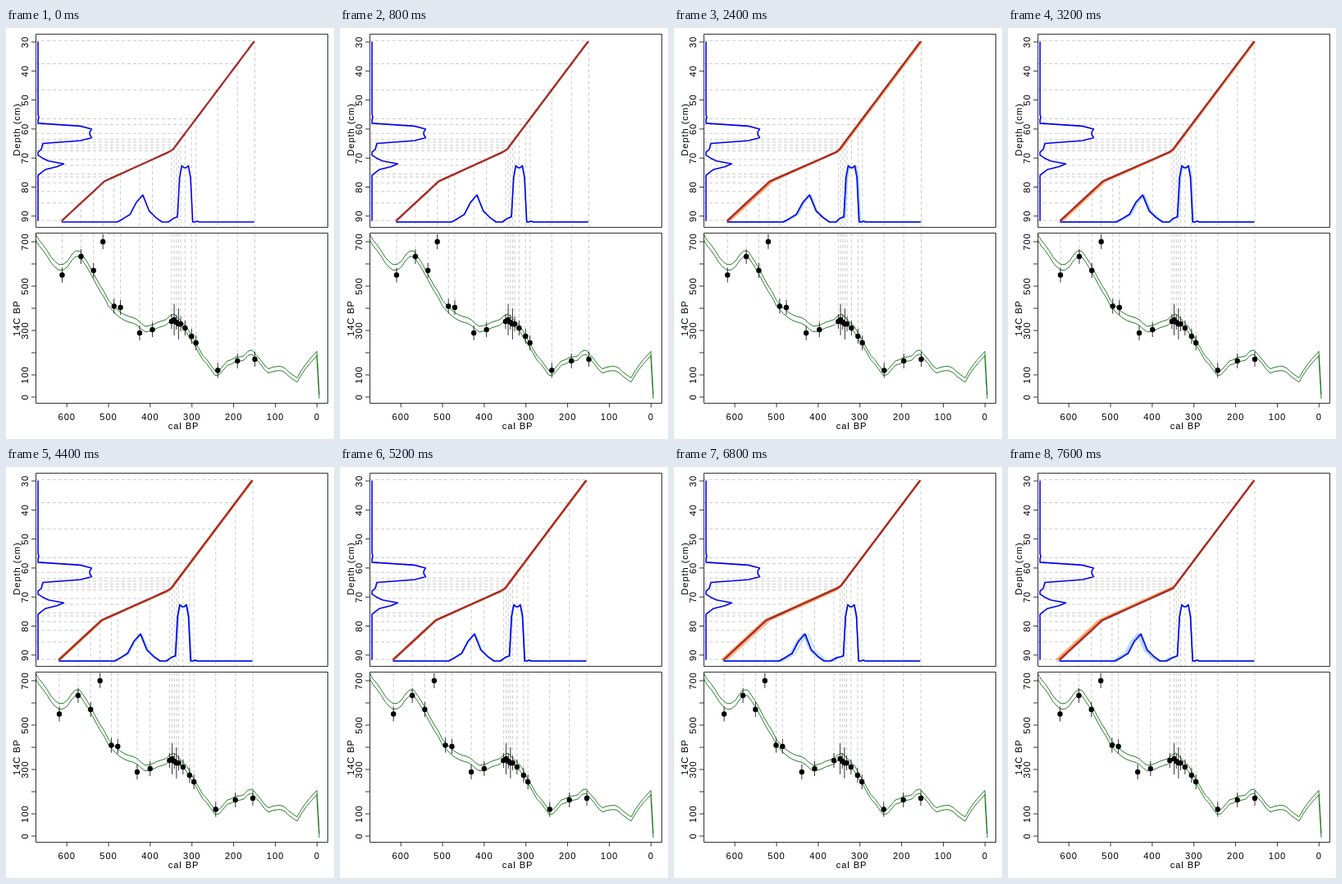
Recreate the animation shown at these times as an HTML page. Size 400 px wide and 500 px high, loop 8 s.

```html
<!DOCTYPE html>
<html>
<head>
<meta charset="utf-8">
<style>
html, body { margin: 0; height: 100%; overflow: hidden; background: #fff; }
svg { display: block; width: 100vw; height: 100vh; fill: none; stroke-linejoin: round; stroke-linecap: round; }
text { font: 11.2px "Liberation Sans", Arial, sans-serif; letter-spacing: 0.9px; fill: #000; text-anchor: middle; }
.axis { stroke: #000; stroke-width: 0.8; stroke-linecap: butt; }
.dash { stroke: #cbcbcb; stroke-dasharray: 4 3; stroke-linecap: butt; }
.curve { stroke: #0f6e0f; stroke-width: 0.9; }
.model { stroke: #a52a2a; stroke-width: 2.3; }
.proxy { stroke: #0000f0; stroke-width: 1.6; }
.oldModel { stroke: #f58a3a; stroke-width: 2; }
.oldProxy { stroke: #8fc1e6; stroke-width: 1.4; }
.bars { stroke: #333; }
.dots { stroke: #000; stroke-width: 6.4; }
</style>
</head>
<body>
<svg viewBox="0 0 400 500">
  <defs><clipPath id="low"><rect x="36" y="250" width="357" height="207"/></clipPath></defs>
  <g id="scene"></g>
  <g id="axes"></g>
</svg>
<script>
const STEP = 400, COUNT = 20, TRAIL = 6;
const ageX = a => 379.3 - 0.5085 * a;
const depthY = d => 17 + 3.53 * (d - 30);
const c14Y = c => 449 - 0.27 * c;
const mix = (a, b, t) => a + (b - a) * t;
const line = pts => 'M' + pts.map(p => p.map(v => v.toFixed(2)).join()).join('L');
const path = (cls, d, extra = '') => `<path class="${cls}" d="${d}" ${extra}/>`;

// Linear interpolation in rows sorted by their first entry
function lerpRows(rows, at) {
  const i = Math.max(1, rows.findIndex(r => r[0] >= at));
  const p = rows[i - 1], q = rows[i];
  return p.map((v, j) => mix(v, q[j], (at - p[0]) / (q[0] - p[0])));
}

// Dated samples: depth, y of the date, half length of its error bar
const dates = [
  [29.5, 403], [37.5, 405], [46.5, 416.5], [56.5, 383], [58.5, 375], [61.5, 365], [63.5, 360],
  [64.5, 360, 18.5], [65.5, 358], [66.5, 355, 18.5], [67.5, 357], [70.5, 367], [72.5, 371],
  [75.5, 340], [76.5, 338.5], [78.5, 260], [81.5, 295], [85.5, 278], [91.5, 300.5]];

// Proxy signal: a flat-topped block, its tail, and a sharp peak
function proxyAt(d) {
  if (d >= 59 && d <= 64) return 64.5 - 0.29 * (d - 61.5) ** 4 + 2.5 * Math.cos(2.1 * (d - 60));
  if (d >= 65 && d <= 67) return 71 - d;
  if (d >= 70 && d <= 75) return 34.3 / (1 + (d - 72.3) ** 2);
  return d === 56 ? 1 : 0;
}
const depths = [...Array.from({ length: 62 }, (_, i) => 30 + i), 91.5];

// Age model: step, x at the top, depth of the first bend, x at the bottom
const keys = [
  [0, 303.5, 67.4, 68.5], [2, 303.5, 67.4, 69], [4, 302, 67.8, 66.5], [8, 301, 67.6, 64],
  [10, 302, 67.5, 66.5], [11, 301, 67.4, 65], [13, 301, 67.4, 65.2], [15, 301, 66.1, 58.8], [19, 301, 67, 63.5]];

function modelAt(step) {
  const [, top, bend, end] = lerpRows(keys, step);
  const mid = top - 2.66 * (bend - 29.5), low = end + 51.6;
  return d => d < bend ? mix(top, mid, (d - 29.5) / (bend - 29.5))
    : d < 78 ? mix(mid, low, (d - bend) / (78 - bend))
    : mix(low, end, (d - 78) / 13.5);
}

const modelPath = x => line(depths.map(d => [x(d), depthY(d)]));
const proxyPath = x => line(depths.map(d => [x(d), 236 - 1.045 * proxyAt(d)]));
const sideProxy = line(depths.map(d => [39 + proxyAt(d), depthY(d)]));

// Calibration curve: bends of its centre line, roughened every ten years
const bends = [
  [35, 253], [58, 286], [66, 292.5], [74, 288], [83, 275], [88, 273], [92, 276], [127, 338], [146, 354],
  [157, 355], [169, 366.5], [192, 359.5], [204, 351], [221, 368], [241, 402], [257, 422.5], [272, 406],
  [291, 401.5], [298, 391], [319, 418], [328, 414.5], [338, 414.5], [354, 429], [366, 410], [379, 396], [382, 448]];
let seed = 7;
const random = () => (seed = seed * 16807 % 2147483647) / 2147483647;
const centre = [];
for (let x = 35; x < 379; x += 5) centre.push([x, lerpRows(bends, x)[1] + 2 * random() - 1]);
centre.push(...bends.slice(-2));
const edge = s => path('curve', line(centre.map(([x, y]) => [x, y + s * (x < 230 ? 3.4 : 2.6)])), 'clip-path="url(#low)"');
const curves = edge(-1) + edge(1);

function axes() {
  let ticks = 'M36.5 7.5H392.5V242.5H36.5ZM36.5 249.5H392.5V456.5H36.5Z', labels = '';
  const label = (s, x, y, turn) => labels += `<text transform="translate(${x} ${y})${turn ? 'rotate(-90)' : ''}">${s}</text>`;
  for (let d = 30; d <= 90; d += 10) {
    ticks += `M36 ${depthY(d)}h-5`;
    label(d, 27, depthY(d), true);
  }
  for (let v = 0; v <= 700; v += 100) {
    ticks += `M36 ${c14Y(v)}h-5`;
    if (!v || v % 200) label(v, 27, c14Y(v), true);
    if (v < 700) {
      ticks += `M${ageX(v)} 456.5v5`;
      label(v, ageX(v), 477, false);
    }
  }
  label('Depth (cm)', 17, 123.5, true);
  label('14C BP', 17, 353, true);
  label('cal BP', 216.5, 487.5, false);
  return path('axis', ticks) + labels;
}

function scene(step) {
  const x = modelAt(step);
  let dash = '', bars = '', dots = '', trail = '';
  for (const [d, y, err = 8.7] of dates) {
    const px = x(d).toFixed(2), py = depthY(d);
    dash += `M36 ${py}H${px}M${px} ${py}V242M${px} 250V${y}`;
    bars += `M${px} ${Math.max(250, y - err)}V${y + err}`;
    dots += `M${px} ${y}h0`;
  }
  for (let age = Math.min(TRAIL, step); age > 0; age--) {
    const old = modelAt(step - age);
    const fade = `opacity="${0.75 * (1 - (age - 1) / TRAIL)}"`;
    trail += path('oldModel', modelPath(old), fade) + path('oldProxy', proxyPath(old), fade);
  }
  return path('dash', dash) + trail + path('model', modelPath(x)) +
    path('proxy', proxyPath(x) + sideProxy) + curves + path('bars', bars) + path('dots', dots);
}

const stage = document.getElementById('scene');
document.getElementById('axes').innerHTML = axes();
const start = performance.now();
let shown = -1;
function tick() {
  const step = Math.floor((performance.now() - start) / STEP) % COUNT;
  if (step !== shown) stage.innerHTML = scene(shown = step);
  requestAnimationFrame(tick);
}
tick();
</script>
</body>
</html>
```
